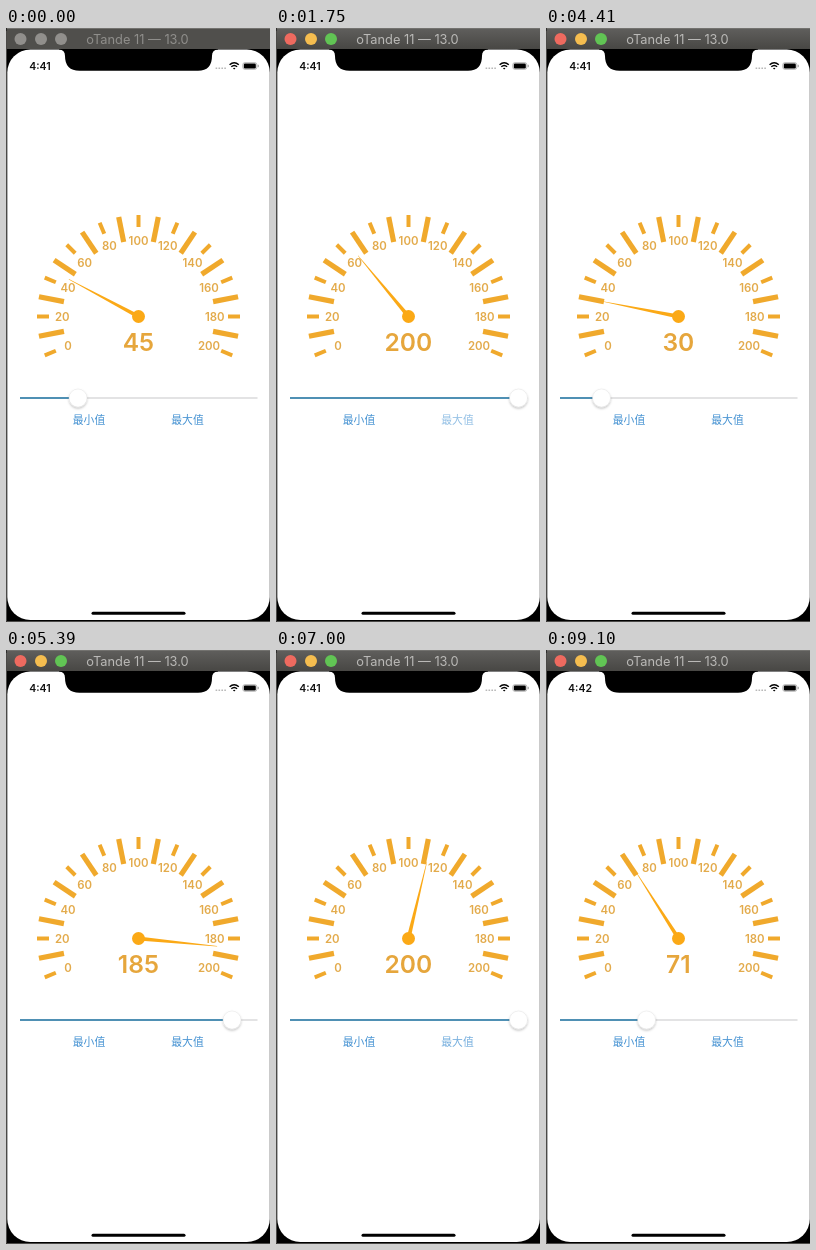
Animation of 264x594 px, one loop 9.17 s. Source, as an HTML page:

```html
<!DOCTYPE html>
<html lang="zh">
<head>
<meta charset="utf-8">
<title>Gauge</title>
<style>
  html, body { margin: 0; width: 100%; height: 100%; overflow: hidden; background: #000; }
  svg { display: block; width: 100vw; height: 100vh; }
  text { font-family: Inter, "Liberation Sans", sans-serif; text-anchor: middle; }
  .button { font: 10.8px "Noto Sans CJK SC", "Noto Sans CJK", "Noto Sans CJK JP", sans-serif; fill: #4592d2; }
</style>
</head>
<body>
<svg viewBox="0 0 264 594">
  <defs>
    <filter id="shadow" x="-50%" y="-50%" width="200%" height="200%">
      <feDropShadow dx="0" dy="1.4" stdDeviation="1.2" flood-color="#000" flood-opacity=".25"/>
    </filter>
    <linearGradient id="active" x2="0" y2="1">
      <stop stop-color="#605f5d"/>
      <stop offset="1" stop-color="#484744"/>
    </linearGradient>
  </defs>

  <!-- window and phone -->
  <rect width="264" height="594" fill="#000"/>
  <rect id="bar" x=".5" width="263.5" height="21"/>
  <path d="M1 .5H264" stroke="#73726f"/>
  <path d="M.5 3V593.5H264" fill="none" stroke="#4a4947"/>
  <g id="lights"></g>
  <text id="title" x="131.5" y="15.7" font-size="12.8">oTande 11 — 13.0</text>
  <rect x="1.3" y="21.6" width="262.5" height="570.4" rx="23" fill="#fff"/>
  <path d="M53 21H212V21.6Q206 22 206 28Q206 42.7 192 42.7H73.5Q59 42.7 59 28Q59 22 53 21.6Z"/>
  <rect x="85.5" y="583.8" width="94" height="3" rx="1.5"/>

  <!-- status bar -->
  <text id="clock" x="34" y="41.5" font-size="10.5" font-weight="600" fill="#111"></text>
  <path d="M209.6 40.3H220" stroke="#b8b8b8" stroke-width="1.6" stroke-dasharray="1.6 1.3"/>
  <g fill="none" stroke="#000" stroke-width="1.5">
    <path d="M223.6 36.8Q228.2 32.6 232.8 36.8M225.3 38.8Q228.2 36.2 231.1 38.8"/>
    <path d="M228.2 41.6L226.9 40.2Q228.2 39.2 229.5 40.2Z" fill="#000" stroke="none"/>
  </g>
  <rect x="236.8" y="34.7" width="14" height="6.6" rx="2" fill="none" stroke="#999" stroke-width=".7"/>
  <rect x="237.8" y="35.6" width="12" height="4.8" rx="1.2"/>
  <path d="M252.2 36.8v2.4" stroke="#999" stroke-width="1"/>

  <!-- gauge -->
  <g id="ticks" stroke="#f0a92c"></g>
  <g id="labels" fill="#e3ab4c" font-size="11.4" font-weight="600"></g>
  <text id="number" x="132.4" y="323.4" font-size="24.6" font-weight="600" fill="#e6a63c"></text>
  <g transform="translate(132.5 288.5)" fill="#fba916">
    <path id="needle" d="M0 -2L-79 -.2V.2L0 2Z"/>
    <circle r="6.5"/>
  </g>

  <!-- slider -->
  <path d="M14 370H251.5" stroke="#e3e3e4" stroke-width="1.8"/>
  <path id="fill" stroke="#4f90b4" stroke-width="1.8"/>
  <circle id="thumb" cy="370" r="9" fill="#fff" stroke="#ddd" stroke-width=".4" filter="url(#shadow)"/>

  <text id="min" class="button" x="83" y="395.8">最小值</text>
  <text id="max" class="button" x="181.5" y="395.8">最大值</text>
</svg>
<script>
const LOOP = 9170, STEP = 70, FIRST = 45, TURN = 500, FADE = 400;
const CX = 132.5, CY = 288.5;
const $ = id => document.getElementById(id);

// A tap is pressed at `from` and released at `to`; a drag runs between them.
const moves = [
  { tap: "min", from: 560, to: 630, v: 0 },
  { tap: "max", from: 1470, to: 1560, v: 200 },
  { tap: "min", from: 3185, to: 3250, v: 0 },
  { from: 3920, to: 4340, v: 30 },
  { from: 4620, to: 5110, v: 185 },
  { tap: "min", from: 5810, to: 5872, v: 0 },
  { tap: "max", from: 6720, to: 6730, v: 200 },
  { from: 7910, to: 8610, v: 71 }
];

const clamp = x => Math.min(1, Math.max(0, x));
const smooth = p => p * p * (3 - 2 * p);
const angle = v => v * 1.125 - 22.5;

function add(parent, tag, attrs, text = "") {
  const el = document.createElementNS("http://www.w3.org/2000/svg", tag);
  for (const k in attrs) el.setAttribute(k, attrs[k]);
  el.textContent = text;
  $(parent).append(el);
}

function build() {
  for (let i = 0; i <= 20; i++) {
    const long = i % 2, a = angle(i * 10);
    add("ticks", "path", {
      d: `M-101.5 0H${long ? -76 : -89.5}`,
      "stroke-width": long ? 5.2 : 4,
      transform: `translate(${CX} ${CY}) rotate(${a})`
    });
    if (long) continue;
    const r = a * Math.PI / 180;
    add("labels", "text", {
      x: CX - 76.3 * Math.cos(r),
      y: CY - 76.3 * Math.sin(r) + 4.4
    }, i * 10);
  }
  for (const cx of [14.5, 35, 55]) add("lights", "circle", { cx, cy: 11, r: 6 });
}

// Slider value, or the needle's value, which trails behind it.
function valueAt(t, needle) {
  let v = FIRST;
  for (const m of moves) {
    let p;
    if (m.tap) p = needle ? smooth(clamp((t - m.to) / TURN)) : +(t >= m.to);
    else p = clamp((t - (needle ? 60 : 0) - m.from) / (m.to - m.from)) ** 1.2;
    v += (m.v - v) * p;
  }
  return v;
}

function buttonOpacity(name, t) {
  let o = 1;
  for (const m of moves) {
    if (m.tap === name && t >= m.from) o = 0.2 + 0.8 * clamp((t - m.to) / FADE);
  }
  return o;
}

function draw(t) {
  const active = t >= 560, v = valueAt(t, false), x = 22.5 + 1.1 * v;
  $("bar").setAttribute("fill", active ? "url(#active)" : "#504f4c");
  $("title").setAttribute("fill", active ? "#bab9b7" : "#8f8e8b");
  const colors = active ? ["#ee6a5f", "#f5bd4f", "#61c454"] : ["#918f8c", "#918f8c", "#918f8c"];
  [...$("lights").children].forEach((c, i) => c.setAttribute("fill", colors[i]));
  $("clock").textContent = t < 7350 ? "4:41" : "4:42";
  $("number").textContent = Math.round(v);
  $("needle").setAttribute("transform", `rotate(${angle(valueAt(t, true))})`);
  $("fill").setAttribute("d", `M14 370H${x}`);
  $("thumb").setAttribute("cx", x);
  for (const name of ["min", "max"]) $(name).setAttribute("opacity", buttonOpacity(name, t));
}

build();
const start = performance.now();
function tick() {
  const t = (performance.now() - start) % LOOP;
  draw(Math.floor(t / STEP) * STEP);
  requestAnimationFrame(tick);
}
tick();
</script>
</body>
</html>
```
